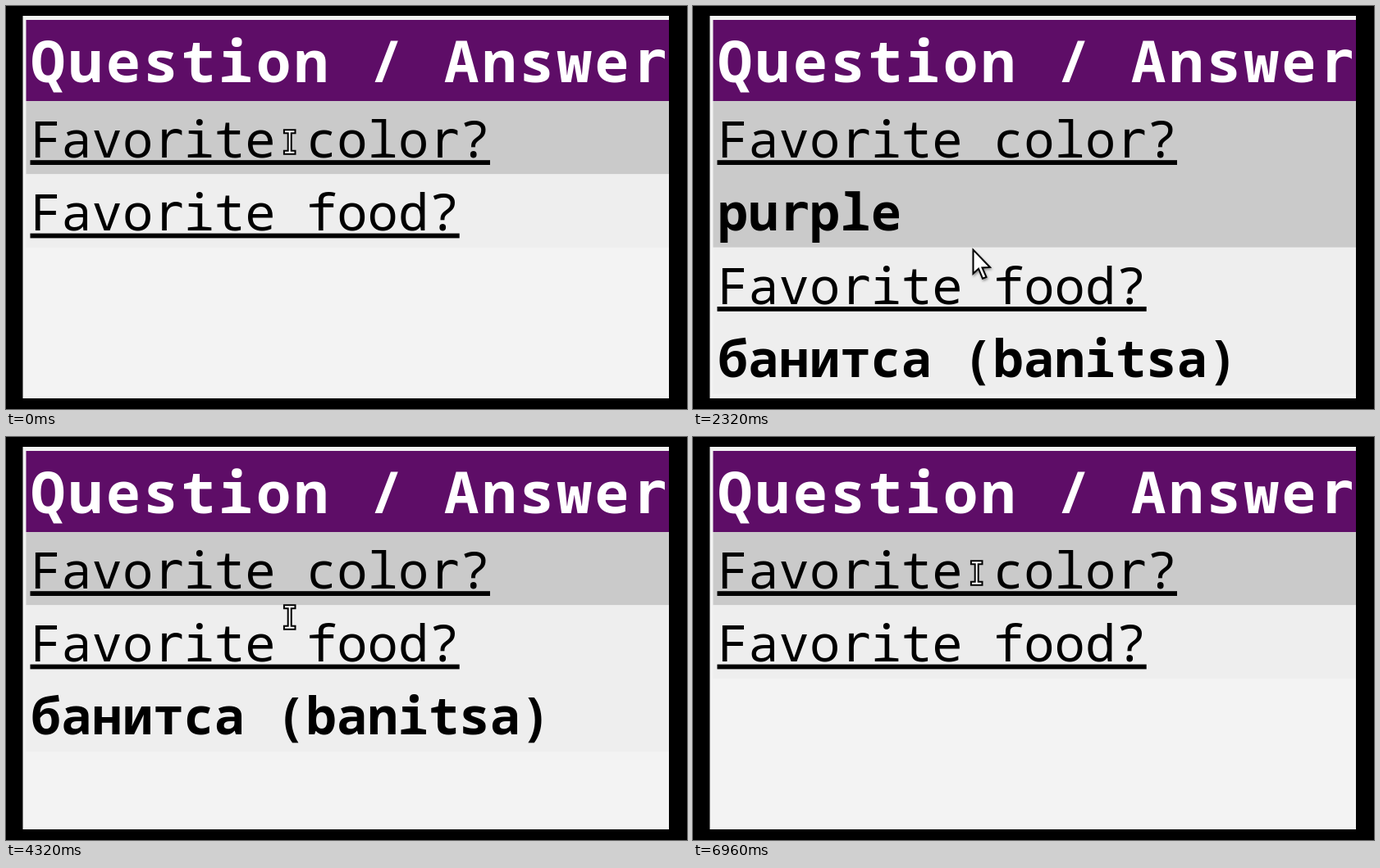
An HTML page that plays this animation: 830 px wide and 492 px high, repeating every 7200 ms.

```html
<!DOCTYPE html>
<html lang="en">
<head>
<meta charset="utf-8">
<title>Question / Answer</title>
<style>
  html, body { margin: 0; width: 100%; height: 100%; overflow: hidden; background: #000; }
  svg { display: block; width: 830px; height: 492px; }
  text { font: 62.2px "Roboto Mono", "Noto Sans Mono", monospace; white-space: pre; }
  .bold { font-weight: 600; }
  .head { font-size: 70.5px; letter-spacing: .05em; fill: #fff; }
  .plain { font-family: "Roboto Mono", "DejaVu Sans Mono", monospace; }
</style>
</head>
<body>
<svg viewBox="0 0 830 492">
  <defs>
    <clipPath id="panel"><rect x="20.5" y="12" width="787.5" height="467"/></clipPath>
    <filter id="shadow" x="-50%" y="-50%" width="200%" height="200%">
      <feDropShadow dx="1" dy="2" stdDeviation="1.5" flood-opacity=".4"/>
    </filter>
  </defs>
  <rect width="830" height="492"/>
  <g clip-path="url(#panel)">
    <rect x="20" y="12" width="788" height="467" fill="#f3f3f3"/>
    <rect x="24.5" y="17" width="784" height="99" fill="#5e0d67"/>
    <text class="bold head" x="30" y="93">Question / Answe<tspan class="plain">r</tspan></text>
    <g id="color">
      <rect class="row" x="24.5" width="784" fill="#cacaca"/>
      <text x="30" y="69">Favo<tspan class="plain">r</tspan>ite colo<tspan class="plain">r</tspan>?</text>
      <rect x="29.5" y="72.2" width="560.5" height="5.8"/>
      <text class="bold answer" x="30" y="158">pu<tspan class="plain">r</tspan>ple</text>
    </g>
    <g id="food">
      <rect class="row" x="24.5" width="784" fill="#eee"/>
      <text x="30" y="69">Favo<tspan class="plain">r</tspan>ite food?</text>
      <rect x="29.5" y="72.2" width="523.2" height="5.8"/>
      <text class="bold answer" x="30" y="158">банитса (banitsa)</text>
    </g>
  </g>
  <g id="arrow" filter="url(#shadow)">
    <path d="M0 0V29L6.5 23L11.5 35L16 33.2L11 21.8L20.5 21.3Z" fill="#fff" stroke="#000" stroke-width="2"/>
  </g>
  <g id="beam" fill="none" stroke-linecap="square">
    <path d="M-4.8 -12.8H4.8M0 -12.8V12.8M-4.8 12.8H4.8" stroke="#000" stroke-width="6"/>
    <path d="M-4.8 -12.8H4.8M0 -12.8V12.8M-4.8 12.8H4.8" stroke="#fff" stroke-width="2"/>
  </g>
</svg>
<script>
const LOOP = 7200, TOP = 116, ROW = 89.4;
const byId = id => document.getElementById(id);
const [color, food, arrow, beam] = ["color", "food", "arrow", "beam"].map(byId);

// Pointer height: [time, y]
const path = [
  [0, 166], [200, 166], [520, 235], [920, 293], [1640, 346.5], [2000, 346.5],
  [2720, 207], [2920, 190], [3440, 166], [3760, 166], [4320, 220], [4520, 232],
  [5160, 252], [5520, 252], [5680, 235], [6240, 190], [6960, 166], [7200, 166]
];

const slope = i => (path[i + 1][1] - path[i][1]) / (path[i + 1][0] - path[i][0]);

function tangent(i) {
  if (i === 0 || i === path.length - 1) return 0;
  const a = slope(i - 1), b = slope(i);
  return a * b > 0 ? 2 * a * b / (a + b) : 0;
}

// Monotone cubic through the path points
function pointerY(t) {
  const i = path.findIndex((p, k) => k + 1 < path.length && t < path[k + 1][0]);
  const [t0, y0] = path[i], [t1, y1] = path[i + 1];
  const d = t1 - t0, u = (t - t0) / d, v = 1 - u;
  return y0 * (1 + 2 * u) * v * v + y1 * u * u * (3 - 2 * u)
    + d * u * v * (tangent(i) * v - tangent(i + 1) * u);
}

function setItem(item, y, open) {
  item.setAttribute("transform", `translate(0 ${y})`);
  item.querySelector(".row").setAttribute("height", ROW * (open ? 2 : 1));
  item.querySelector(".answer").style.display = open ? "" : "none";
}

function place(cursor, x, y, shown) {
  cursor.setAttribute("transform", `translate(${x} ${y})`);
  cursor.style.display = shown ? "" : "none";
}

function draw(t) {
  const colorOpen = t >= 40 && t < 3600;
  const foodOpen = t >= 1840 && t < 5360;
  setItem(color, TOP, colorOpen);
  setItem(food, TOP + ROW * (colorOpen ? 2 : 1), foodOpen);

  const y = pointerY(Math.floor(t / 40) * 40);
  const line = Math.floor((y - TOP) / ROW);
  const inLine = y - TOP - line * ROW;
  const overText = inLine > 3.5 && inLine < 86 && !(colorOpen && line === 1);
  place(beam, 345.7, y, overText);
  place(arrow, 341.5, y, !overText);
}

function tick(now) {
  draw(now % LOOP);
  requestAnimationFrame(tick);
}
draw(0);
requestAnimationFrame(tick);
</script>
</body>
</html>
```
